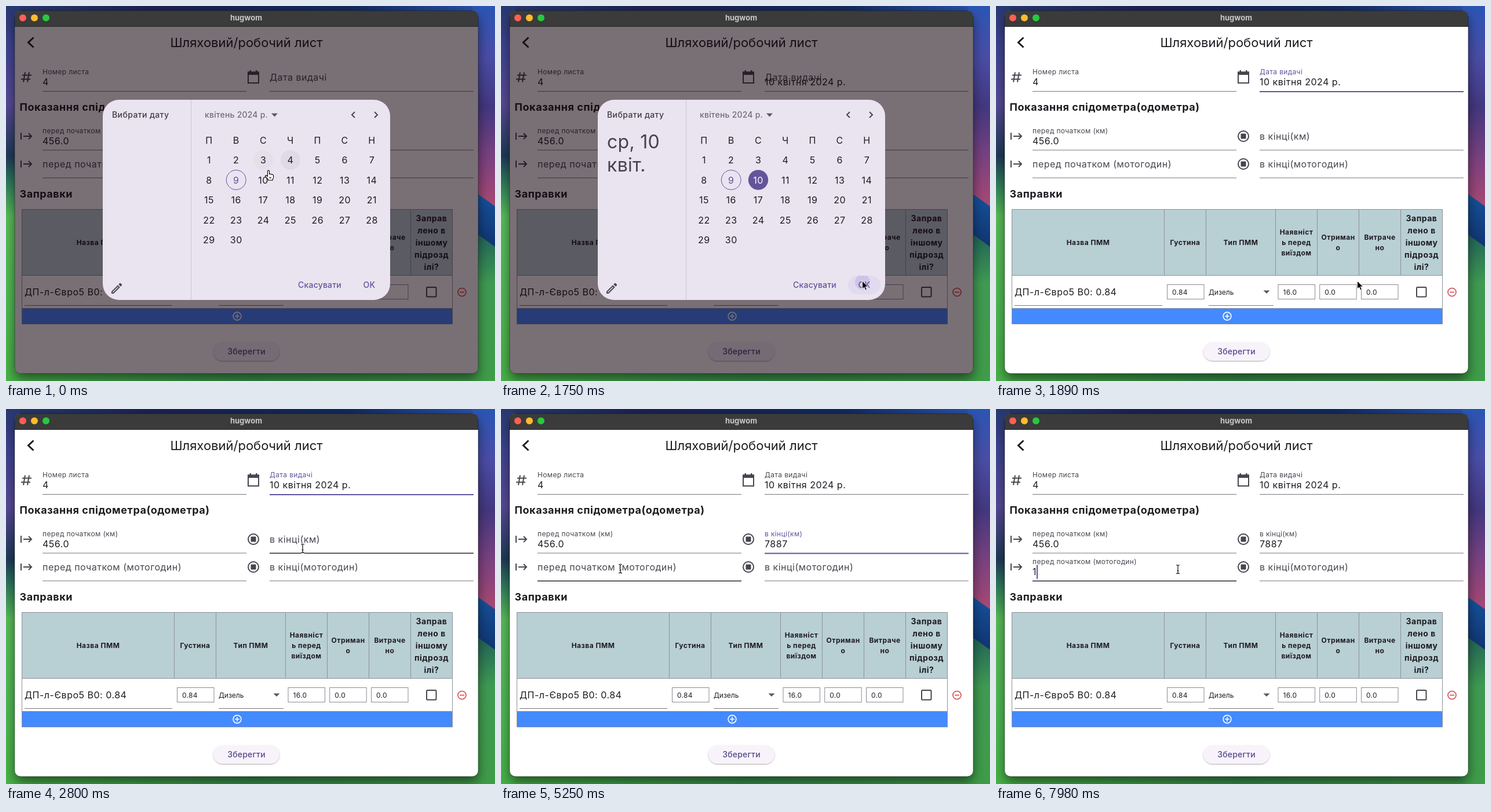
Recreate the animation shown at these times as an HTML page. Size 844 px wide and 648 px high, loop 8000 ms.

```html
<!DOCTYPE html>
<html lang="uk">
<head>
<meta charset="utf-8">
<title>Шляховий лист</title>
<style>
html, body { margin: 0; width: 100%; height: 100%; overflow: hidden; background: #1b2a55; }
svg { display: block; width: 844px; height: 648px; }
text { font-family: Inter, "Noto Sans", sans-serif; fill: #1d1b20; white-space: pre; }
.body { font-size: 16px; letter-spacing: .5px; }
.label { fill: #49454f; }
.title { font-size: 22px; }
.head { font-size: 18px; font-weight: 700; letter-spacing: .55px; }
.th { font-size: 12px; font-weight: 700; letter-spacing: .5px; }
.th.big { font-size: 14px; }
.cell { font-size: 12px; letter-spacing: .3px; }
.btn { font-size: 14px; font-weight: 500; letter-spacing: .2px; }
.huge { font-size: 32px; letter-spacing: .3px; fill: #46424c; }
.bar { font-size: 13px; font-weight: 700; fill: #c9c9c9; }
.mid { text-anchor: middle; }
.icon { fill: none; stroke: #49454f; stroke-width: 2; }
.violet { fill: #62529c; }
</style>
</head>
<body>
<svg viewBox="0 0 844 648">
  <defs>
    <linearGradient id="left" x2="0" y2="1">
      <stop offset="0" stop-color="#27386f"/><stop offset=".1" stop-color="#3d4390"/>
      <stop offset=".26" stop-color="#574a97"/><stop offset=".4" stop-color="#1f3a58"/>
      <stop offset=".47" stop-color="#2f7a5c"/><stop offset=".56" stop-color="#58bd58"/>
      <stop offset=".8" stop-color="#4fb852"/><stop offset="1" stop-color="#47b147"/>
    </linearGradient>
    <linearGradient id="top">
      <stop offset="0" stop-color="#27386f"/><stop offset=".3" stop-color="#1b2150"/>
      <stop offset=".7" stop-color="#12285c"/><stop offset="1" stop-color="#2a55b4"/>
    </linearGradient>
    <linearGradient id="right" x2="0" y2="1">
      <stop offset="0" stop-color="#2a55b4"/><stop offset=".25" stop-color="#4a4da6"/>
      <stop offset=".5" stop-color="#43377f"/><stop offset=".75" stop-color="#7b4180"/>
      <stop offset="1" stop-color="#ab4a72"/>
    </linearGradient>
    <linearGradient id="navy" x2="0" y2="1">
      <stop offset="0" stop-color="#16549f"/><stop offset="1" stop-color="#0f2f68"/>
    </linearGradient>
    <linearGradient id="green" x2="0" y2="1">
      <stop offset="0" stop-color="#1f5f58"/><stop offset=".35" stop-color="#3f9a52"/>
      <stop offset="1" stop-color="#3f9c48"/>
    </linearGradient>
    <linearGradient id="bottom">
      <stop offset="0" stop-color="#47b147"/><stop offset=".5" stop-color="#37904a"/>
      <stop offset="1" stop-color="#3f9c48"/>
    </linearGradient>
    <filter id="soft" x="-20%" y="-30%" width="140%" height="180%">
      <feDropShadow dx="0" dy="1" stdDeviation="1.2" flood-opacity=".35"/>
    </filter>
    <filter id="blur" x="-10%" y="-10%" width="120%" height="120%">
      <feGaussianBlur stdDeviation="10"/>
    </filter>
    <clipPath id="win"><rect x="15" y="8" width="800" height="627" rx="10"/></clipPath>
    <clipPath id="okPill"><rect x="599" y="466" width="56" height="32" rx="16"/></clipPath>
  </defs>

  <g id="wallpaper">
    <rect width="844" height="10" fill="url(#top)"/>
    <rect y="630" width="844" height="18" fill="url(#bottom)"/>
    <rect width="24" height="648" fill="url(#left)"/>
    <rect x="805" width="39" height="350" fill="url(#right)"/>
    <path d="M805 318L844 346V430H805Z" fill="url(#navy)"/>
    <path d="M805 388L844 416V648H805Z" fill="url(#green)"/>
    <rect x="15" y="18" width="800" height="627" rx="10" fill-opacity=".5" filter="url(#blur)"/>
  </g>

  <g clip-path="url(#win)">
    <rect x="15" y="8" width="800" height="627" fill="#fff"/>
    <g id="page"></g>
    <g id="fields"></g>
    <rect id="scrim" x="15" y="36" width="800" height="599" fill="#10000c"/>
    <rect x="15" y="8" width="800" height="28" fill="#3a3b3a"/>
    <path d="M15 35.5H815" stroke="#2a2b2a"/>
    <circle cx="29" cy="20.5" r="6" fill="#ff5f57"/>
    <circle cx="49" cy="20.5" r="6" fill="#febc2e"/>
    <circle cx="69" cy="20.5" r="6" fill="#28c840"/>
    <text class="bar mid" x="414.5" y="25">hugwom</text>
  </g>
  <rect x="15" y="8" width="800" height="627" rx="10" fill="none" stroke="#000" stroke-opacity=".35"/>

  <g id="dialog">
    <rect x="167" y="162" width="496" height="346" rx="28" fill="#eae4f0"/>
    <path d="M319.5 162V508" stroke="#cac4d0"/>
    <g id="hovers"></g>
    <circle cx="397.2" cy="300.5" r="16.9" fill="none" stroke="#62529c"/>
    <circle id="picked" cx="444" cy="300.5" r="17.2" fill="#64549c"/>
    <g id="days"></g>
    <text class="btn" x="183" y="193" style="fill:#3d3942;letter-spacing:.4px">Вибрати дату</text>
    <g id="headline">
      <text class="huge" x="183" y="246">ср, 10</text>
      <text class="huge" x="183" y="286">квіт.</text>
    </g>
    <text class="btn" x="343" y="193" style="fill:#716c77">квітень 2024 р.</text>
    <path d="M458 185.5H469L463.500 191.500Z" fill="#5d5863"/>
    <path class="icon" d="M602 183L597 188L602 193M636 183L641 188L636 193"/>
    <path d="M182 497V493.200L193 482.200L196.800 486L185.800 497ZM194.200 481L196 479.200Q197 478.500 198 479.200L199.800 481Q200.500 482 199.800 483L198 484.800Z" fill="#49454f"/>
    <path d="M184 495V494L193 485L194 486L185 495Z" fill="#eae4f0"/>
    <g id="okHover" clip-path="url(#okPill)">
      <rect x="599" y="466" width="56" height="32" fill="#e1dbef"/>
      <circle id="splash" cx="624" cy="477" fill="#cdc4e8"/>
    </g>
    <text class="btn violet mid" x="541.500" y="487">Скасувати</text>
    <text class="btn violet mid" x="627" y="487">OK</text>
  </g>

  <g id="cursor">
    <path id="arrow" d="M0 0V14L3.300 11L5.600 16.200L8 15.100L5.700 10.100H10Z" fill="#000" stroke="#fff"/>
    <path id="hand" d="M-1.500 1Q0 -.8 1.500 1V6.500Q3 5.400 4 6.800Q5.500 5.900 6.500 7.400Q8.500 7 8.600 9V12Q8.300 14 7.200 15.500V17H-.5V15.700L-5 10.800Q-6 9 -4.300 8.600Q-3 8.600 -1.500 10.500ZM2 11.500V14M4 11.500V14" fill="#fff" stroke="#000" stroke-width="1.100"/>
    <g id="beam" fill="none">
      <path d="M-3 -7.500Q0 -7.500 0 -5.500Q0 -7.500 3 -7.500M0 -6V6M-3 7.500Q0 7.500 0 5.500Q0 7.500 3 7.500M-1.500 2.500H1.500" stroke="#fff" stroke-width="3"/>
      <path d="M-3 -7.500Q0 -7.500 0 -5.500Q0 -7.500 3 -7.500M0 -6V6M-3 7.500Q0 7.500 0 5.500Q0 7.500 3 7.500M-1.500 2.500H1.500" stroke="#111" stroke-width="1.200"/>
    </g>
  </g>
</svg>

<script>
const LOOP = 8000, TICK = 70;
const CLOSE = 1750, CLOSED = 1890, PICK = 420;
const $ = id => document.getElementById(id);
const clamp = v => Math.max(0, Math.min(1, v));
const ease = v => { v = clamp(v); return v * v * (3 - 2 * v); };
const text = (cls, x, y, s) => `<text class="${cls}" x="${x}" y="${y}">${s}</text>`;
const path = (d, extra = '') => `<path class="icon" d="${d}" ${extra}/>`;
const show = (id, on) => $(id).setAttribute('visibility', on ? 'inherit' : 'hidden');

// Static page
const startIcon = y => path(`M26 ${y - 6}V${y + 6}M30 ${y}H44M39 ${y - 5}L44 ${y}L39 ${y + 5}`);
const stopIcon = y => `<circle class="icon" cx="427" cy="${y}" r="9"/>
  <rect x="422.500" y="${y - 4.5}" width="9" height="9" rx="1" fill="#49454f"/>`;
const lines = (cls, x, y, step, list) =>
  list.map((s, i) => text(cls + ' mid', x, y + i * step, s)).join('');
const input = (x, s) =>
  `<rect x="${x}" y="481.500" width="63.500" height="25" fill="none" stroke="#8d8993"/>`
  + text('cell', x + 8.5, 499, s);

$('page').innerHTML = [
  path('M47.500 54.500L38.500 63L47.500 71.500', 'style="stroke:#1d1b20;stroke-width:3"'),
  text('title mid', 415, 71, 'Шляховий/робочий лист'),
  path('M28 119.500H44M26 126.500H42M33 114.500L30 131.500M40 114.500L37 131.500'),
  path('M418 114.500H436V133H418Z'),
  '<path d="M417 113.500H437V119H417ZM420.500 111H423V114H420.500ZM431 111H433.500V114H431Z" fill="#49454f"/>',
  text('head', 23.5, 181, 'Показання спідометра(одометра)'),
  startIcon(225), startIcon(273), stopIcon(225), stopIcon(273),
  text('head', 23.5, 331, 'Заправки'),
  '<rect x="27.500" y="351.500" width="743" height="114" fill="#b8cfd4"/>',
  '<rect x="27.500" y="522.500" width="743" height="27" fill="#448aff"/>',
  '<path d="M27.500 351.500H770.500V549.500H27.500ZM27.500 465.500H770.500M27.500 522.500H770.500'
    + [290.5, 362.5, 482.5, 554.5, 626.5, 698.5].map(x => `M${x} 351.500V465.500`).join('')
    + '" fill="none" stroke="#8f9199"/>',
  lines('th', 159, 413, 18, ['Назва ПММ']),
  lines('th', 326.5, 413, 18, ['Густина']),
  lines('th', 422.5, 413, 18, ['Тип ПММ']),
  lines('th', 518.5, 395, 18, ['Наявніст', 'ь перед', 'виїздом']),
  lines('th', 590.5, 404, 18, ['Отриман', 'о']),
  lines('th', 662.5, 404, 18, ['Витраче', 'но']),
  lines('th big', 734.5, 372, 21, ['Заправ', 'лено в', 'іншому', 'підрозд', 'ілі?']),
  text('body', 32, 500, 'ДП-л-Євро5 B0: 0.84'),
  '<path d="M32 517.500H287M367 517.500H479" stroke="#79747e"/>',
  input(295.5, '0.84'), input(487, '16.0'), input(558.7, '0.0'), input(630.5, '0.0'),
  '<text class="cell" x="367" y="499" style="letter-spacing:0">Дизель</text>',
  '<path d="M461.500 491.500H472.500L467 497Z" fill="#5d5863"/>',
  '<rect class="icon" x="726" y="486" width="16.500" height="16.500" rx="1.500"/>',
  '<circle cx="787" cy="494.500" r="7" fill="none" stroke="#d4484c" stroke-width="1.600"/>',
  path('M783 494.500H791', 'style="stroke:#d4484c;stroke-width:1.600"'),
  '<circle cx="399" cy="536" r="6.900" fill="none" stroke="#fff" stroke-width="1.600"/>',
  path('M395 536H403M399 532V540', 'style="stroke:#fff;stroke-width:1.600"'),
  '<rect x="358" y="581" width="114" height="32" rx="16" fill="#f8f3fb" filter="url(#soft)"/>',
  '<text class="btn mid" x="415" y="602" style="fill:#54478c">Зберегти</text>'
].join('');

// Form fields: u is the underline, float the time the label rises
const typed = (s, times) => t => s.slice(0, times.filter(at => t >= at).length);
const fixed = s => () => s;
const fields = [
  { x: 63, u: 147.5, label: 'Номер листа', float: -1e3, value: fixed('4') },
  { x: 455, u: 147.5, label: 'Дата видачі', float: CLOSE, focus: [1820, 2940],
    value: t => t >= CLOSE ? '10 квітня 2024 р.' : '' },
  { x: 63, u: 249, label: 'перед початком (км)', float: -1e3, value: fixed('456.0') },
  { x: 455, u: 249, label: 'в кінці(км)', float: 2940, focus: [2940, 5670],
    value: typed('7887', [3640, 3850, 4060, 4340]),
    caretOn: [[3010, 3430], [3640, 4900], [5390, 5670]] },
  { x: 63, u: 297, label: 'перед початком (мотогодин)', float: 5670, focus: [5670, LOOP],
    value: typed('1', [7630]), caretOn: [[5740, 6370], [6860, 7420], [7630, LOOP]] },
  { x: 455, u: 297, label: 'в кінці(мотогодин)', float: 1e5, value: fixed('') }
];
$('fields').innerHTML = fields.map(f => `<g>
  <rect x="${f.x}" width="352"/>
  ${text('body label', 0, 0, f.label)}${text('body', f.x, f.u - 10.5, '')}
  <rect y="${f.u - 27.5}" width="2" height="24" fill="#62529c"/></g>`).join('');
fields.forEach((f, i) => {
  [f.line, f.tag, f.text, f.caret] = $('fields').children[i].children;
});

// Calendar
const colX = c => 350.4 + c * 46.85, rowY = r => 232 + r * 34.5;
const days = Array.from({ length: 30 }, (_, i) => ({ n: i + 1, x: colX(i % 7), y: rowY(1 + (i / 7 | 0)) }));
$('days').innerHTML = [...'ПВСЧПСН'].map((s, c) => text('body mid', colX(c), 237.5, s)).join('')
  + days.map(d => text('body mid', d.x, d.y + 5.5, d.n)).join('');
$('hovers').innerHTML = days.map(d => `<circle cx="${d.x}" cy="${d.y - .5}" r="17" fill="#1d1b20"/>`).join('');
const dayText = n => $('days').children[6 + n];
dayText(9).style.fill = '#62529c';

// Pointer path: time, x, y
const track = [
  [-130, 491, 262], [-70, 455, 268], [0, 453, 284], [560, 453, 284],
  [1190, 618, 470], [1260, 618, 470], [1400, 623.5, 475], [1950, 623.5, 475],
  [2730, 512, 241], [4550, 512, 241], [5250, 206, 276], [5320, 206, 276],
  [5530, 198, 277], [7840, 198, 277], [7980, 314, 277]
];
function pointer(t) {
  const i = track.findIndex(k => k[0] > t);
  if (i < 0) return track.at(-1).slice(1);
  const a = track[Math.max(0, i - 1)], b = track[i];
  const k = ease((t - a[0]) / (b[0] - a[0] || 1));
  return [a[1] + (b[1] - a[1]) * k, a[2] + (b[2] - a[2]) * k];
}
const overDay = (d, [x, y]) => Math.abs(x - d.x) < 23.4 && Math.abs(y - d.y) < 17.25;
const overOk = ([x, y]) => x > 599 && x < 655 && y > 466 && y < 498;
const within = (t, [a, b]) => t >= a && t < b;

function drawField(f, t, p) {
  const over = t >= CLOSED && p[0] >= f.x && p[0] <= f.x + 352 && p[1] <= f.u && p[1] > f.u - 48;
  const focus = f.focus && within(t, f.focus);
  const violet = focus && !over;
  f.line.setAttribute('height', violet ? 2 : over ? 1.4 : 1);
  f.line.setAttribute('y', f.u - .5);
  f.line.setAttribute('fill', violet ? '#62529c' : over ? '#1d1b20' : '#79747e');
  const k = ease((t - f.float) / 140);
  f.tag.setAttribute('transform', `translate(${f.x} ${f.u - 18.5 - 11 * k}) scale(${1 - .25 * k})`);
  f.tag.style.fill = violet ? '#62529c' : '#49454f';
  f.text.textContent = f.value(t);
  const on = f.caretOn && f.caretOn.some(span => within(t, span));
  f.caret.setAttribute('visibility', on ? 'inherit' : 'hidden');
  if (on) f.caret.setAttribute('x', f.x + (f.text.textContent ? f.text.getComputedTextLength() : 0));
  return over;
}

function drawDialog(t, p) {
  const alpha = 1 - clamp((t - CLOSE) / (CLOSED - CLOSE));
  $('dialog').setAttribute('opacity', alpha);
  $('scrim').setAttribute('opacity', .56 * alpha);
  if (!alpha) return false;
  const picked = t >= PICK;
  show('picked', picked);
  show('headline', picked);
  dayText(10).style.fill = picked ? '#fff' : '';
  // Hover glow trails the pointer by up to three ticks
  const trail = [1, 2, 3].map(k => pointer(t - TICK * k));
  days.forEach((d, i) => {
    const glow = trail.filter(q => overDay(d, q)).length / trail.length;
    $('hovers').children[i].setAttribute('opacity', .07 * glow);
  });
  show('okHover', overOk(p));
  $('splash').setAttribute('r', Math.max(0, (t - 1540) / 16));
  return t < 1610 && (overOk(p) || days.some(d => overDay(d, p)));
}

function draw(t) {
  const p = pointer(t);
  const hand = drawDialog(t, p);
  const beam = fields.map(f => drawField(f, t, p)).some(Boolean);
  $('cursor').setAttribute('transform', `translate(${p})`);
  show('hand', hand);
  show('beam', beam);
  show('arrow', !hand && !beam);
}

const t0 = performance.now();
(function tick() {
  const t = (performance.now() - t0) % LOOP;
  draw(Math.floor(t / TICK) * TICK);
  requestAnimationFrame(tick);
})();
</script>
</body>
</html>
```
